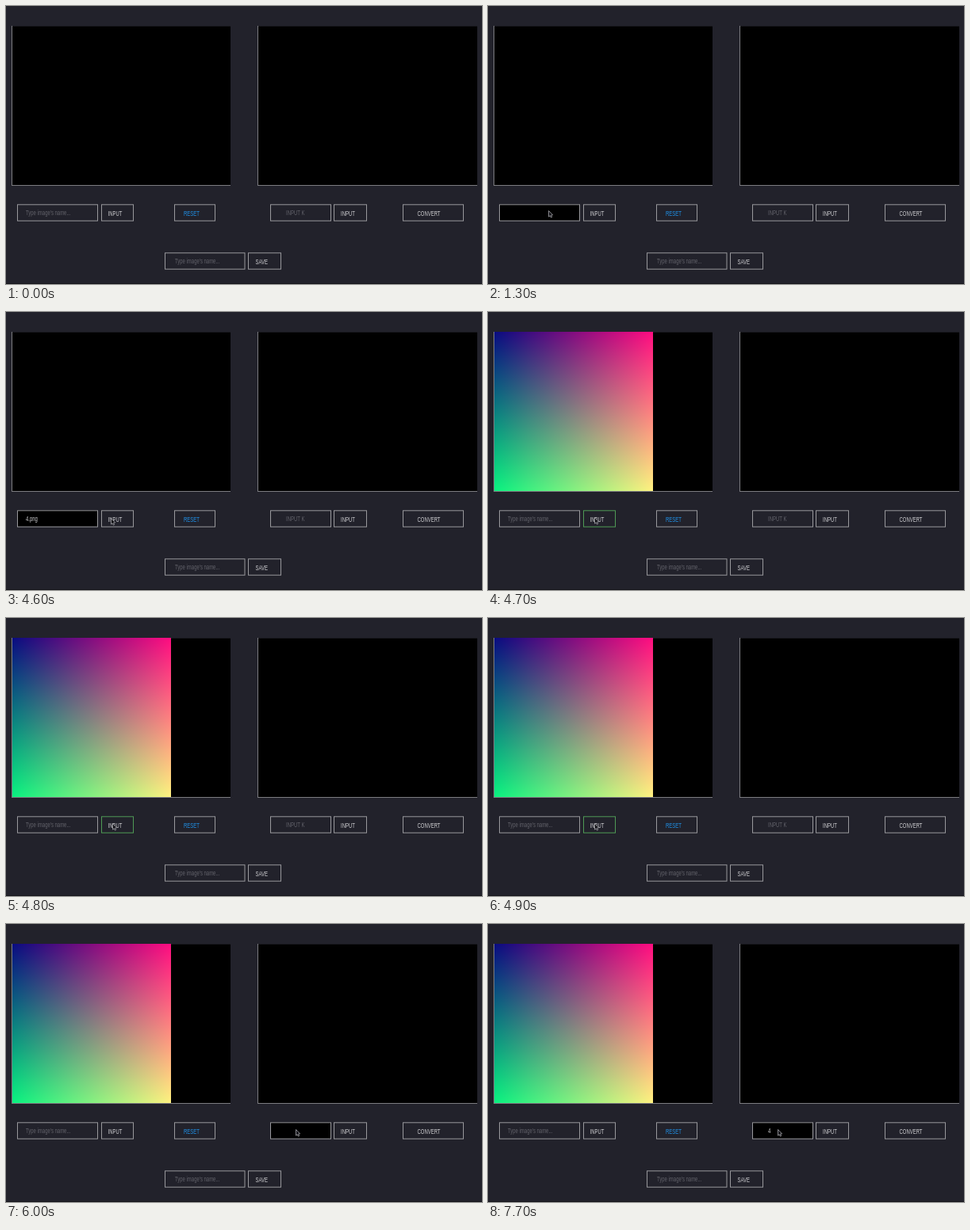
These frames come from a looping animation (600 px wide and 351 px high, 8000 ms). An HTML page with a canvas:

```html
<!DOCTYPE html>
<html lang="en">
<head>
<meta charset="utf-8">
<title>Image converter</title>
<style>
  html, body { margin: 0; overflow: hidden; background: #22222b; }
  canvas { display: block; }
</style>
</head>
<body>
<canvas id="stage" width="600" height="351"></canvas>
<script>
const ctx = document.getElementById('stage').getContext('2d');
const LOOP = 8000, STEP = 100;
const CONDENSE = 0.7; // narrow sans look for all labels
const LINE = '#98989c', TEXT = '#cdcdd0', HINT = '#62626a', BLUE = '#2090e6', GREEN = '#4f9a55';

// Pointer keys: time, x, y
const path = [
  [100, 534, 257], [200, 335, 285], [300, 138, 313], [400, 138, 313],
  [500, 158, 337], [1100, 76, 258], [4100, 76, 258], [4300, 95, 266],
  [4600, 132, 260], [4700, 134, 259], [5100, 134, 259], [5700, 365, 259]
];
const keyTimes = [2000, 2400, 3200, 3500, 3600];

function rect(x, y, w, h, color) {
  ctx.fillStyle = color;
  ctx.fillRect(x, y, w, h);
}

function label(text, x, y, color) {
  ctx.save();
  ctx.translate(x, y);
  ctx.scale(CONDENSE, 1);
  ctx.font = '8.5px "Liberation Sans", Arial, sans-serif';
  ctx.fillStyle = color;
  ctx.fillText(text, 0, 0);
  ctx.restore();
}

function box(x, y, w, text, textX, color = TEXT, border = LINE, fill) {
  if (fill) rect(x, y, w, 21, fill);
  ctx.strokeStyle = border;
  ctx.lineWidth = 1;
  ctx.strokeRect(x + 0.5, y + 0.8, w, 20.4);
  label(text, textX, y + (color === HINT ? 14 : 15), color);
}

function field(x, y, w, hint, textX, active, value) {
  if (!active) return box(x, y, w, hint, textX, HINT);
  box(x, y, w, '', textX, TEXT, LINE, '#000');
  label(value, textX, y + 14, TEXT);
}

function panel(x, w) {
  rect(x, 25, w, 202, '#000');
  rect(x, 25, w, 1, '#17171c');
  rect(x, 25, 1, 202, '#7c7c80');
  rect(x, 226, w, 1, '#7c7c80');
}

function ramp(x1, y1, from, to) {
  const g = ctx.createLinearGradient(8, 25, x1, y1);
  g.addColorStop(0, from);
  g.addColorStop(1, to);
  rect(8, 25, 200, 201, g);
}

// Red grows to the right, green grows downward, blue is constant
function picture() {
  rect(8, 25, 200, 201, '#000080');
  ctx.globalCompositeOperation = 'lighter';
  ramp(208, 25, '#080000', '#ff0000');
  ramp(8, 226, '#000c00', '#00f200');
  ctx.globalCompositeOperation = 'source-over';
}

function pointer(t) {
  if (t < path[0][0]) return;
  let i = path.findIndex(key => key[0] > t);
  if (i < 0) i = path.length;
  const a = path[i - 1], b = path[i] || a;
  const k = b === a ? 0 : (t - a[0]) / (b[0] - a[0]);
  ctx.save();
  ctx.translate(a[1] + (b[1] - a[1]) * k + 0.5, a[2] + (b[2] - a[2]) * k + 0.5);
  ctx.beginPath();
  [[0, 0], [0, 7.6], [1.7, 6.2], [2.9, 8.6], [4.1, 8], [3, 5.6], [5.1, 5.4]]
    .forEach(p => ctx.lineTo(...p));
  ctx.closePath();
  ctx.fillStyle = '#111116';
  ctx.strokeStyle = '#a8a8ac';
  ctx.lineWidth = 0.8;
  ctx.fill();
  ctx.stroke();
  ctx.restore();
}

function draw(now) {
  const t = Math.floor(now % LOOP / STEP) * STEP;
  const loaded = t >= 4700;
  const typed = '4.png'.slice(0, keyTimes.filter(k => k <= t).length);

  rect(0, 0, 600, 351, '#22222b');
  rect(0, 350, 600, 1, '#15151b');
  panel(7, 276);
  panel(317, 277);
  if (loaded) picture();

  field(14, 250, 101, "Type image's name...", 25, t >= 1300 && !loaded, typed);
  box(120, 250, 40, 'INPUT', 128.5, TEXT, loaded && t < 5900 ? GREEN : LINE);
  box(212, 250, 51, 'RESET', 224, BLUE);
  field(333, 250, 76, 'INPUT K', 353, t >= 5900, t >= 7700 ? '4' : '');
  box(413, 250, 41, 'INPUT', 422);
  box(500, 250, 76, 'CONVERT', 518.5);
  field(200, 311, 100.5, "Type image's name...", 213, false);
  box(305, 311, 41, 'SAVE', 314.5);
  pointer(t);
  requestAnimationFrame(draw);
}
requestAnimationFrame(draw);
</script>
</body>
</html>
```
